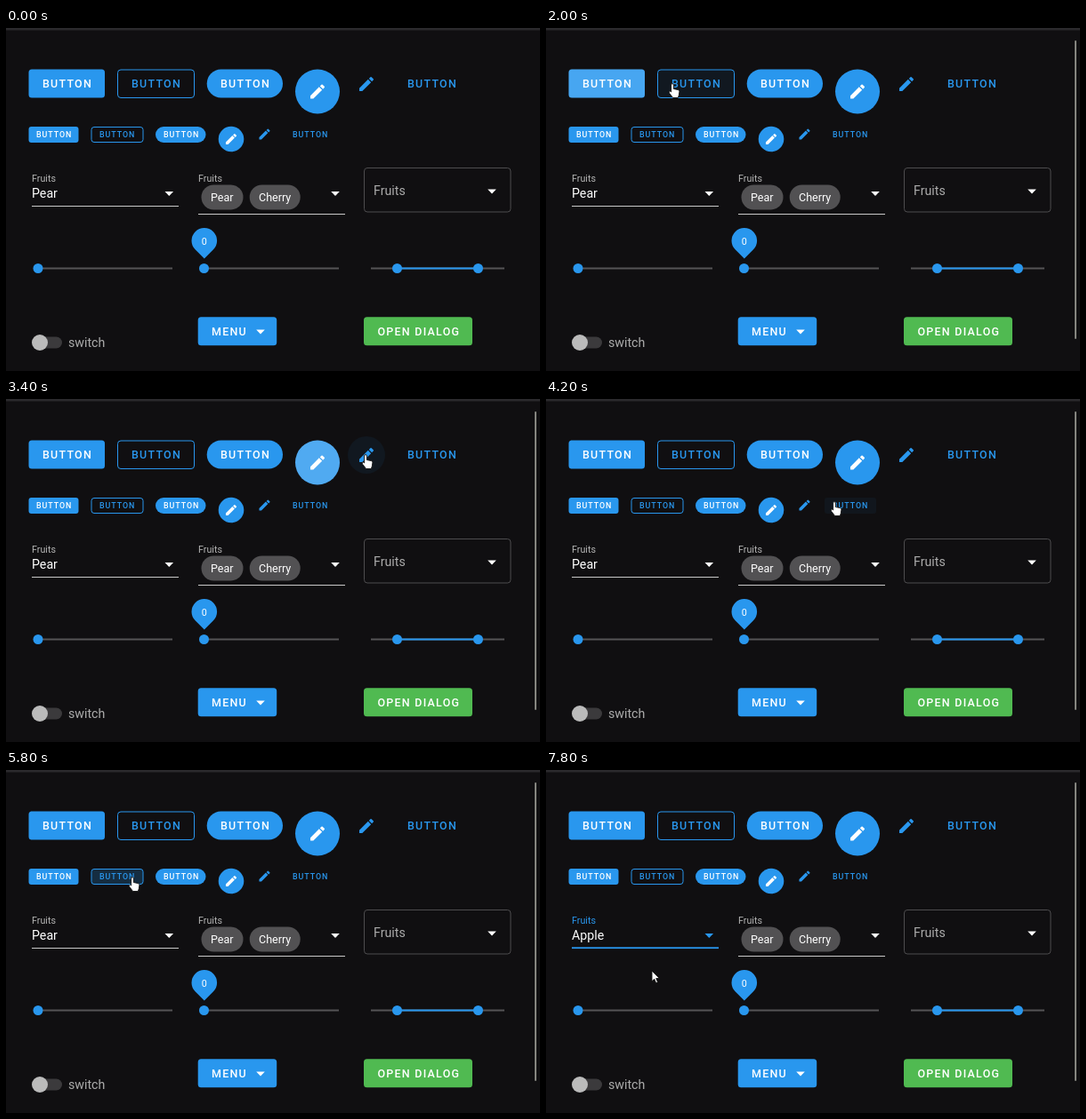
An HTML page for the animation above (8 s loop, 600x386 px).

```html
<!DOCTYPE html>
<html lang="en">
<head>
<meta charset="utf-8">
<title>Dark component gallery</title>
<style>
  html, body { margin: 0; width: 100%; height: 100%; overflow: hidden; background: #100f11; }
  svg { display: block; width: 100%; height: 100%; font: 14.2px Roboto, sans-serif; fill: #fff; }
  .blue { fill: #2997ee; }
  .outline { fill: none; stroke: #2997ee; }
  .caps { font-weight: 500; font-size: 12.46px; letter-spacing: 1.25px; }
  .small { font-weight: 500; font-size: 8.9px; letter-spacing: .95px; }
  .label { font-size: 10.7px; fill: #b5b5b5; }
  .chip { font-size: 12.5px; }
  .muted { fill: #acacac; }
</style>
</head>
<body>
<svg id="stage" viewBox="0 0 600 386" preserveAspectRatio="none"></svg>
<script>
const BLUE = '#2997ee', LOOP = 8000, STEP = 200;
const stage = document.getElementById('stage');

const rect = (x, y, w, h, r, attrs = '') =>
  `<rect x="${x}" y="${y}" width="${w}" height="${h}" rx="${r}" ${attrs}/>`;
const text = (x, y, value, cls = '', attrs = '') =>
  `<text x="${x}" y="${y}" class="${cls}" ${attrs}>${value}</text>`;
const line = (x1, x2, y, color, width) =>
  `<path d="M${x1} ${y}H${x2}" stroke="${color}" stroke-width="${width}"/>`;
const dot = (x, y, r, attrs = 'class="blue"') => `<circle cx="${x}" cy="${y}" r="${r}" ${attrs}/>`;
const arrow = (x, y, attrs = '') => `<path d="M${x - 4.8} ${y}h9.6l-4.8 4.9z" ${attrs}/>`;
const pencil = (x, y, size, cls = '') =>
  `<path class="${cls}" transform="translate(${x} ${y}) scale(${size}) translate(-12 -12)"
    d="M3 17.25V21h3.75L17.81 9.94l-3.75-3.75zM20.71 7.04a1 1 0 0 0 0-1.41l-2.34-2.34a1 1 0 0 0-1.41 0l-1.83 1.83 3.75 3.75z"/>`;

// Each row: x, y, width, height, radius, style, content x
const buttons = [
  [25.5, 46.5, 85.5, 32, 3.5, 'solid', 41],
  [125.5, 47, 86, 31.5, 3.5, 'outline', 141],
  [225.7, 46.5, 85.3, 32, 16, 'solid', 241],
  [325, 46.5, 50, 50, 25, 'solid'],
  [384, 42, 42, 42, 21, 'plain'],
  [436, 46.5, 85, 32, 3.5, 'plain', 451],
  [25.5, 111, 56, 18, 3, 'solid', 34],
  [96, 111.5, 58, 17, 3, 'outline', 105],
  [168, 111, 56.5, 18, 9, 'solid', 177],
  [238.7, 110.7, 28.6, 28.6, 14.3, 'solid'],
  [278, 107, 25, 25, 12.5, 'plain'],
  [313, 111, 58, 18, 3, 'plain', 322],
];

function drawButton([x, y, w, h, r, style, textX], index) {
  const small = y > 100, solid = style === 'solid';
  const face = style === 'plain' ? '' : rect(x, y, w, h, r, `class="${solid ? 'blue' : 'outline'}"`);
  const shade = rect(x, y, w, h, r, `id="shade${index}" fill="${solid ? '#fff' : BLUE}" opacity="0"`);
  const cls = solid ? '' : 'blue';
  const content = textX
    ? text(textX, small ? 123 : 67, 'BUTTON', `${small ? 'small' : 'caps'} ${cls}`)
    : pencil(x + w / 2, y + h / 2, small ? .67 : .89, cls);
  return face + shade + content;
}

stage.innerHTML = [
  rect(0, 0, 600, 2.5, 0, 'fill="#2b2a2d"'),
  rect(594, 14, 2, 336, 1, 'id="scrollbar" fill="#85857f"'),
  ...buttons.map(drawButton),

  text(29, 172.5, 'Fruits', 'label', 'id="fieldLabel"'),
  text(29, 191, 'Pear', '', 'id="fieldValue"'),
  arrow(183.3, 184, 'id="fieldArrow"'),
  rect(29, 200, 165, 1, 0, 'id="fieldLine" fill="#c8c8c8"'),

  text(216, 172.5, 'Fruits', 'label'),
  rect(219.5, 176.5, 47, 28, 14, 'fill="#525153"') + text(230, 195, 'Pear', 'chip'),
  rect(273.7, 176.5, 57, 28, 14, 'fill="#525153"') + text(284, 195, 'Cherry', 'chip'),
  arrow(370, 184),
  line(216, 381, 209.5, '#c8c8c8', 1),

  rect(402.5, 157.5, 164.5, 49.5, 3.5, 'fill="none" stroke="#4d4c4e"'),
  text(413, 187.5, 'Fruits', 'muted'),
  arrow(546, 181.5),

  line(36, 187, 270.5, '#555456', 1.8) + dot(36, 270.5, 5.5),
  line(222, 374, 270.5, '#555456', 1.8) + dot(222.5, 270.5, 5.5),
  '<path class="blue" d="M222.8 259.5l-10.2-10.2a14.3 14.3 0 1 1 20.4 0z"/>',
  text(222.8, 243.5, '0', '', 'font-size="10.7" text-anchor="middle"'),
  line(410, 560, 270.5, '#555456', 1.8) + line(439.5, 530, 270.5, BLUE, 1.8),
  dot(439.5, 270.5, 5.5) + dot(530.5, 270.5, 5.5),

  rect(31, 347.5, 32, 13, 6.5, 'fill="#3b3a3c"') + dot(38, 354, 9, 'fill="#bbb"'),
  text(70, 359, 'switch', 'muted'),
  rect(215.7, 325.3, 88.5, 32, 3.5, 'class="blue"') + text(231, 346, 'MENU', 'caps') + arrow(286, 339.5),
  rect(402, 325.3, 122, 32, 3.5, 'fill="#50ba51"') + text(417.5, 346, 'OPEN DIALOG', 'caps'),

  '<g id="menu">',
  rect(28, 202, 167, 144, 4, 'fill="#0a090b"'),
  rect(29, 201, 165.5, 142.5, 3, 'fill="#1f1e20"'),
  rect(29, 207, 165.5, 43, 0, 'id="appleRow" opacity="0"'),
  rect(29, 250, 165.5, 43, 0, 'fill="#21384d"'),
  text(44, 234, 'Apple') + text(44, 276.7, 'Pear', 'blue') + text(44, 319.5, 'Cherry'),
  '</g>',

  `<g id="cursor" stroke="#111" stroke-width=".9" stroke-linejoin="round">
    <path id="hand" d="M-1.4 9V1a1.4 1.4 0 0 1 2.8 0V5.5l5 1.1q1.7.4 1.5 2.1l-.6 4-1 2.8H.6L-3.3 10.4q-1.4-2.2.5-2.5z"/>
    <path id="pointer" d="M0 0V11.8l2.7-2.5 1.9 4.3 2-.9-1.9-4.1 3.6-.2z"/>
  </g>`,
].join('');

// Cursor path: time, x, y of the hot spot
const path = [
  [1000, 180, 150], [1400, 76, 64], [1700, 78, 64], [2000, 142, 63], [2200, 165, 62],
  [2500, 228, 59], [2800, 244, 59], [3000, 300, 64], [3200, 350, 70], [3400, 404, 63],
  [3600, 470, 62], [3800, 478, 66], [4000, 402, 92], [4200, 324, 116], [4600, 290, 119],
  [4900, 253, 124], [5300, 200, 120], [5600, 146, 120], [5800, 142, 121], [6000, 70, 120],
  [6200, 50, 121], [6500, 165, 180], [6700, 173, 189], [7000, 173, 189],
  [7200, 130, 222], [7400, 119, 226], [8000, 119, 226],
];
const OPEN = 6700, CLOSE = 7500;
const clamp = v => Math.max(0, Math.min(1, v));

function cursorAt(time) {
  const i = path.findIndex(point => point[0] > time);
  if (i < 1) return null;
  const [t0, x0, y0] = path[i - 1], [t1, x1, y1] = path[i];
  const k = (time - t0) / (t1 - t0);
  return [x0 + (x1 - x0) * k, y0 + (y1 - y0) * k];
}

const inside = (p, [x, y, w, h]) => p && p[0] >= x && p[0] <= x + w && p[1] >= y && p[1] <= y + h;

// Share of the last 300 ms spent over the box, giving a linear fade
function hover(time, box) {
  let hits = 0;
  for (let i = 0; i < 15; i++) hits += inside(cursorAt(time - i * 20), box) ? 1 : 0;
  return hits / 15;
}

const set = (id, attrs) => {
  const node = document.getElementById(id);
  for (const name in attrs) node.setAttribute(name, attrs[name]);
};

function render(time) {
  const point = cursorAt(time);
  const open = time >= OPEN && time < CLOSE, focused = time >= OPEN;
  const opacity = clamp((time - OPEN) / 150) * clamp(1 - (time - CLOSE) / 75);

  buttons.forEach((box, i) =>
    set('shade' + i, { opacity: hover(time, box) * (box[5] === 'solid' ? .3 : .25) }));

  set('scrollbar', { opacity: time >= 1000 ? 1 : 0 });
  set('fieldLabel', { style: focused ? `fill:${BLUE}` : '' });
  set('fieldArrow', {
    fill: focused ? BLUE : '#fff',
    transform: open ? 'rotate(180 183.3 186)' : '',
  });
  set('fieldLine', { fill: focused ? BLUE : '#c8c8c8', height: focused ? 1.8 : 1, y: focused ? 199.3 : 200 });
  document.getElementById('fieldValue').textContent = time >= CLOSE ? 'Apple' : 'Pear';

  set('menu', { opacity });
  set('appleRow', { opacity: open ? hover(time, [29, 207, 165, 43]) * .08 : 0 });

  set('cursor', { opacity: point ? 1 : 0 });
  if (!point) return;
  const clickable = buttons.some(box => inside(point, box)) ||
    inside(point, [29, 158, 165, 42]) || (open && inside(point, [29, 201, 165, 142]));
  set('cursor', { transform: `translate(${point})` });
  set('hand', { opacity: clickable ? 1 : 0 });
  set('pointer', { opacity: clickable ? 0 : 1 });
}

const start = performance.now();
function tick() {
  const elapsed = (performance.now() - start) % LOOP;
  render(Math.floor(elapsed / STEP) * STEP);
  requestAnimationFrame(tick);
}
tick();
</script>
</body>
</html>
```
